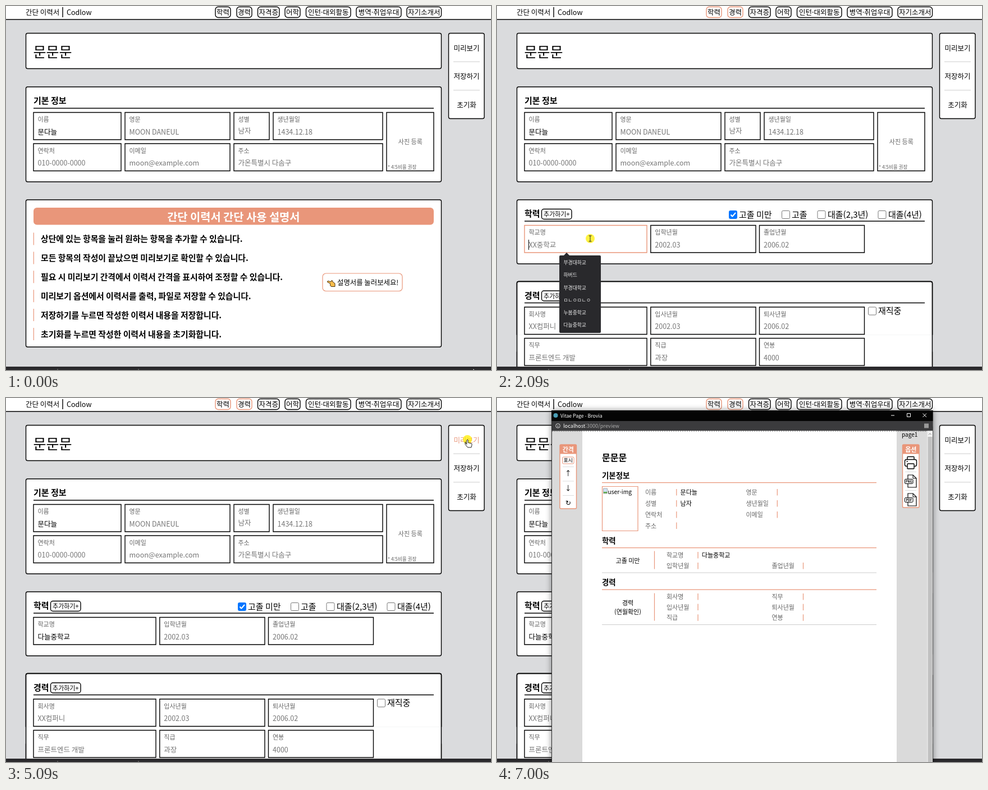
An HTML page with a canvas that plays this animation: 864 by 648 pixels, repeating every 7210 ms.

```html
<!DOCTYPE html>
<html lang="ko">
<head>
<meta charset="utf-8">
<style>
  html, body { margin: 0; width: 100%; height: 100%; overflow: hidden; }
  canvas { display: block; }
</style>
</head>
<body>
<canvas id="stage" width="864" height="648"></canvas>
<script>
const LOOP = 7210;
const FONT = "'Noto Sans CJK KR', 'Noto Sans KR', 'Noto Sans CJK JP', 'Noto Sans', 'DejaVu Sans', sans-serif";
const SALMON = '#e9967a', GRAY = '#666', HINT = '#757575', PAGE = '#dadbdd';
const c = document.getElementById('stage').getContext('2d');

// Pointer path: time, x, y
const PATH = [
  [0, 832, 645], [400, 342, 20], [500, 342, 20], [800, 386, 10], [1100, 388, 10],
  [1200, 399, 13], [1300, 408, 13], [1500, 424, 11], [1700, 424, 11], [2100, 166, 414],
  [2200, 166, 414], [2800, 152, 478], [2900, 152, 478], [3100, 146, 540], [3400, 192, 562],
  [3700, 160, 567], [3800, 160, 567], [4000, 320, 470], [4500, 824, 176], [4600, 824, 176],
  [4800, 822, 126], [5100, 822, 74], [5300, 822, 74], [5500, 737, 116], [5800, 737, 185],
  [6200, 737, 185], [6500, 652, 128], [7000, 852, 652]
];
const CLICKS = [900, 1500, 2100, 3700, 4000, 5100];
const NAV = [['학력', 373, 400], ['경력', 411, 438], ['자격증', 448.5, 487], ['어학', 497, 524],
  ['인턴·대외활동', 534.5, 614], ['병역·취업우대', 624, 704], ['자기소개서', 714, 775.5]];
const SIDE = ['미리보기', '저장하기', '초기화'];
const SCHOOLS = ['부경대하교', '하버드', '부경대학교', 'ㅁㄴㅇㅁㄴㅇ', '누봄중학교', '다늘중학교'];
const GUIDE = ['상단에 있는 항목을 눌러 원하는 항목을 추가할 수 있습니다.',
  '모든 항목의 작성이 끝났으면 미리보기로 확인할 수 있습니다.',
  '필요 시 미리보기 간격에서 이력서 간격을 표시하여 조정할 수 있습니다.',
  '미리보기 옵션에서 이력서를 출력, 파일로 저장할 수 있습니다.',
  '저장하기를 누르면 작성한 이력서 내용을 저장합니다.',
  '초기화를 누르면 작성한 이력서 내용을 초기화합니다.'];

const ARROW = new Path2D('M0 0V13L3 10.2L5 14.8L7 14L5 9.4H9.2Z');
const HAND = new Path2D('M-1.2 1Q0-1 1.2 1V5.5L7 7Q8.5 7.5 8 9.5L6.8 14H0.5L-4 8.5Q-4-0 -2.8 7L-1.2 8.5Z');
const BEAM = new Path2D('M-2.5-5H2.5M0-5V5M-2.5 5H2.5');
const FINGER = new Path2D('M572.5 491.5Q572 489.5 574 489.5L579 491L580 488.5Q582 488 582 491L586 494V499.5H580Q577 499 577.5 494Z');

// Text is placed by its vertical middle
function text(s, x, y, size = 12.5, color = '#000', weight = 400, align = 'left') {
  c.font = `${weight} ${size}px ${FONT}`;
  c.fillStyle = color;
  c.textAlign = align;
  c.fillText(s, x, y + size * 0.37);
}
function rect(x, y, x2, y2, color) {
  c.fillStyle = color;
  c.fillRect(x, y, x2 - x, y2 - y);
}
function box(x, y, x2, y2, stroke = '#000', r = 3, fill = '#fff', width = 1.4) {
  c.beginPath();
  c.roundRect(x, y, x2 - x, y2 - y, r);
  if (fill) { c.fillStyle = fill; c.fill(); }
  if (stroke) { c.strokeStyle = stroke; c.lineWidth = width; c.stroke(); }
}
function line(x, y, x2, y2, color = '#000', width = 1.4) {
  c.beginPath();
  c.moveTo(x, y);
  c.lineTo(x2, y2);
  c.strokeStyle = color;
  c.lineWidth = width;
  c.stroke();
}
function shifted(dy, draw) {
  c.save();
  c.translate(0, dy);
  draw();
  c.restore();
}
function field(label, value, x, y, x2, color = HINT, border = '#000') {
  box(x, y, x2, y + 48.5, border, 0);
  text(label, x + 7.5, y + 12.5, 11, GRAY);
  text(value, x + 7.5, y + 34.5, 12.5, color, color === HINT ? 400 : 500);
}
function checkbox(label, x, y, labelX, checked) {
  box(x, y, x + 14, y + 14, checked ? '#0075ff' : '#767676', 2, checked ? '#0075ff' : '#fff', 1);
  if (checked) {
    line(x + 3, y + 7, x + 6, y + 10.5, '#fff', 2);
    line(x + 5.5, y + 10.5, x + 11.5, y + 3.5, '#fff', 2);
  }
  text(label, labelX, y + 6.5, 15, '#000', 500);
}
function sectionHead(title) {
  box(35.5, 345, 775.5, 459);
  text(title, 49, 369.5, 15, '#000', 700);
  box(79.5, 361.5, 133, 379.5, '#000', 4);
  text('추가하기+', 106.3, 371, 11, '#000', 500, 'center');
  line(49, 383, 762, 383);
}

function pointerAt(t) {
  let i = PATH.findIndex(p => p[0] > t);
  if (i < 0) i = PATH.length - 1;
  const [t0, x0, y0] = PATH[i - 1], [t1, x1, y1] = PATH[i];
  const u = Math.min(1, (t - t0) / (t1 - t0)), e = u * u * (3 - 2 * u);
  return { x: x0 + (x1 - x0) * e, y: y0 + (y1 - y0) * e };
}

function drawHeader(t, hover) {
  rect(0, 0, 864, 24, '#fff');
  line(0, 24, 864, 24, '#000', 1.6);
  text('간단 이력서', 35, 11.5, 12.5, '#000', 500);
  line(101, 2, 101, 20);
  text('Codlow', 108, 11.5, 12.5, '#000', 500);
  NAV.forEach(([name, x, x2], i) => {
    const active = hover.nav === i || (i === 0 && t >= 900) || (i === 1 && t >= 1500);
    box(x, 1.5, x2, 20.5, active ? SALMON : '#000', 5);
    text(name, (x + x2) / 2, 11.5, 12.5, '#000', 500, 'center');
  });
}

function drawSide(hover) {
  box(788.5, 48.5, 852, 200.5);
  SIDE.forEach((name, i) => {
    text(name, 820.5, 75 + i * 50.7, 12.5, hover.side === i ? SALMON : '#000', 500, 'center');
    if (i) line(797, 48.5 + i * 50.7, 844, 48.5 + i * 50.7, '#ccc', 1);
  });
}

function drawBasics() {
  box(35.5, 48.5, 775.5, 111.5);
  text('문문문', 48.5, 82, 25);
  box(35.5, 144, 775.5, 313);
  text('기본 정보', 49, 168.5, 15, '#000', 700);
  line(49, 182, 762, 182);
  field('이름', '문다늘', 49, 189.5, 205, '#000');
  field('영문', 'MOON DANEUL', 212, 189.5, 399);
  field('성별', '', 406, 189.5, 469);
  text('남자', 413.5, 222, 12.5, HINT);
  field('생년월일', '1434.12.18', 476, 189.5, 671);
  field('연락처', '010-0000-0000', 49, 245, 205);
  field('이메일', 'moon@example.com', 212, 245, 399);
  field('주소', '가온특별시 다솜구', 406, 245, 671);
  box(678, 189.5, 762, 293.5, '#000', 0);
  text('사진 등록', 720.3, 242, 11, GRAY, 400, 'center');
  text('* 4:5비율 권장', 680, 287, 8.6, GRAY);
}

function drawEducation(t, hover) {
  const focused = t >= 2100 && t < 4000, picked = t >= 3800;
  const preview = !picked && SCHOOLS[hover.row];
  sectionHead('학력');
  checkbox('고졸 미만', 413.5, 364.5, 431, true);
  checkbox('고졸', 507.5, 364.5, 525);
  checkbox('대졸(2,3년)', 571, 364.5, 589);
  checkbox('대졸(4년)', 679, 364.5, 697);
  const value = picked ? SCHOOLS[5] : preview ? '' : 'XX중학교';
  field('학교명', value, 49, 390.5, 267, picked ? '#000' : HINT, focused ? SALMON : '#000');
  if (preview) text(preview, 56.5, 426, 8.8);
  if (focused) line(56.5, 416, 56.5, 434, '#000', 1);
  field('입학년월', '2002.03', 273.8, 390.5, 461);
  field('졸업년월', '2006.02', 467.5, 390.5, 654.5);
}

function drawCareer() {
  box(35.5, 345, 775.5, 620);
  sectionHead('경력');
  rect(30, 440, 780, 470, PAGE);
  box(35.5, 345, 775.5, 620, '#000', 3, null);
  rect(37, 440, 774, 502, '#fff');
  checkbox('재직중', 661.5, 390.5, 679);
  [['회사명', 'XX컴퍼니', '입사년월', '2002.03', '퇴사년월', '2006.02'],
   ['직무', '프론트엔드 개발', '직급', '과장', '연봉', '4000']].forEach((r, i) => {
    const y = 390.5 + i * 55.5;
    field(r[0], r[1], 49, y, 267);
    field(r[2], r[3], 273.8, y, 461);
    field(r[4], r[5], 467.5, y, 654.5);
  });
}

function drawGuide() {
  box(35.5, 345, 775.5, 607);
  box(49, 359, 762, 389.5, null, 6, SALMON);
  text('간단 이력서 간단 사용 설명서', 405.3, 375.5, 19.8, '#fff', 700, 'center');
  GUIDE.forEach((s, i) => {
    const y = 415 + i * 33.9;
    line(49.3, y - 11.5, 49.3, y + 10.5, SALMON, 1.2);
    text(s, 62, y, 14.85, '#000', 700);
  });
  box(564, 476, 706, 507.5, SALMON, 6, '#fff', 1.2);
  c.fillStyle = '#f9bd4b';
  c.fill(FINGER);
  c.strokeStyle = '#4a3418';
  c.lineWidth = 1;
  c.stroke(FINGER);
  text('설명서를 눌러보세요!', 590, 492, 12.4, '#000', 500);
}

function drawDropdown(hover) {
  c.fillStyle = '#29292c';
  c.beginPath();
  c.moveTo(118, 445);
  c.lineTo(124, 439);
  c.lineTo(130, 445);
  c.fill();
  box(111, 444, 185, 582, null, 2, '#29292c');
  SCHOOLS.forEach((name, i) => {
    const y = 457 + i * 22.2;
    if (hover.row === i) rect(111, y - 11, 185, y + 11, '#3f3f43');
    text(name, 118.5, y, 8.8, '#eee');
  });
}

function printerIcon(color) {
  box(731, 104.5, 743, 110, color, 1);
  box(726.5, 109.5, 747.5, 121.5, color, 3);
  box(731, 117, 743, 126, color, 1);
  line(729.5, 113, 732, 113, color);
}
function fileIcon(label, y, color) {
  c.beginPath();
  for (const [x, dy] of [[732, -11], [741, -11], [747, -5], [747, 11], [732, 11]]) c.lineTo(x, y + dy);
  c.closePath();
  c.strokeStyle = color;
  c.lineWidth = 1.2;
  c.stroke();
  line(741, y - 11, 741, y - 5, color, 1);
  line(741, y - 5, 747, y - 5, color, 1);
  box(726.5, y - 3.5, 741, y + 4.5, color, 1.5, '#fff', 1);
  text(label, 733.8, y + 0.5, 5.5, color, 700, 'center');
}
function panel(title, x, x2, bottom) {
  box(x, 83, x2, bottom, SALMON, 2);
  rect(x, 83, x2, 99.5, SALMON);
  text(title, (x + x2) / 2, 91.5, 11, '#fff', 700, 'center');
}
// Label, bar and value in the printed sheet
function entry(label, x, barX, y, value = '') {
  text(label, x, y, 11, GRAY);
  line(barX, y - 6, barX, y + 5.5, SALMON, 1.2);
  text(value, barX + 6.8, y, 11, '#000', 500);
}
function sheetHead(title, y) {
  text(title, 187, y, 13.4, '#000', 700);
  line(187, y + 12.7, 676, y + 12.7, SALMON, 1.2);
}

function drawSheet(hover) {
  rect(98, 58.5, 776, 648, '#dadada');
  rect(152, 58.5, 712, 648, '#fff');
  c.setLineDash([2, 2]);
  line(98, 59, 766, 59, '#777', 1);
  c.setLineDash([]);
  rect(766.5, 58.5, 776, 648, '#f1f1f1');
  rect(767.5, 69, 775.5, 648, '#c1c1c1');
  line(769, 65.5, 771.3, 63, '#888', 1);
  line(771.3, 63, 773.5, 65.5, '#888', 1);
  text('page1', 721, 65, 10);

  panel('간격', 112, 141.5, 197);
  box(116.5, 105, 137, 117, SALMON, 2, '#fff', 1);
  text('표시', 126.8, 111, 9, '#000', 500, 'center');
  ['↑', '↓', '↻'].forEach((s, i) => {
    line(117, 122.5 + i * 25.5, 137, 122.5 + i * 25.5, '#ddd', 1);
    text(s, 126.8, 135 + i * 26, 12, '#000', 400, 'center');
  });

  panel('옵션', 722.5, 752, 195);
  const tint = i => hover.option === i ? '#eeb29e' : '#000';
  printerIcon(tint(0));
  fileIcon('PNG', 148, tint(1));
  fileIcon('PDF', 181, tint(2));
  line(727, 131.5, 747, 131.5, '#ddd', 1);
  line(727, 164.5, 747, 164.5, '#ddd', 1);
  if (hover.option >= 0) {
    box(722.5, 197, 752, 226.5, null, 3, '#6f6f6f');
    text(['', 'PNG', 'PDF'][hover.option], 737.3, 205, 10, '#fff', 700, 'center');
    text(hover.option ? '저장' : '출력', 737.3, 219, 10, '#fff', 700, 'center');
  }

  text('문문문', 187, 106, 16, '#000', 700);
  sheetHead('기본정보', 138);
  box(187.5, 157.5, 251, 236.5, SALMON, 0, '#fff', 1.2);
  box(189.5, 161, 196.5, 170, '#aaa', 0, '#cfe3f7', 1);
  rect(190, 167, 196, 169.5, '#5fa84a');
  text('user-img', 197.5, 167, 10.3);
  entry('이름', 264, 319.8, 168, '문다늘');
  entry('성별', 264, 319.8, 188, '남자');
  entry('연락처', 264, 319.8, 208);
  entry('주소', 264, 319.8, 227.5);
  ['영문', '생년월일', '이메일'].forEach((s, i) => entry(s, 443.5, 499.3, 168 + i * 20));

  sheetHead('학력', 254);
  text('고졸 미만', 233, 289.5, 11, '#000', 500, 'center');
  line(280.5, 272.5, 280.5, 304.5, SALMON, 1.2);
  entry('학교명', 302, 358, 280, SCHOOLS[5]);
  entry('입학년월', 302, 358, 299);
  entry('졸업년월', 489.5, 545.5, 299);
  line(187, 311, 676, 311, '#ccc', 1);

  sheetHead('경력', 328.5);
  text('경력', 233, 365, 11, '#000', 500, 'center');
  text('(연월확인)', 233, 381, 11, '#000', 500, 'center');
  line(280.5, 347.5, 280.5, 396.5, SALMON, 1.2);
  [['회사명', '직무'], ['입사년월', '퇴사년월'], ['직급', '연봉']].forEach(([a, b], i) => {
    entry(a, 302, 358, 354 + i * 18.6);
    entry(b, 489.5, 545.5, 354 + i * 18.6);
  });
  line(187, 403.5, 676, 403.5, '#ccc', 1);
}

function drawWindow(t, hover) {
  c.save();
  c.shadowColor = 'rgba(0,0,0,.45)';
  c.shadowBlur = 10;
  rect(97, 22, 776.5, 660, '#2b2b2b');
  c.restore();
  rect(97, 22, 776.5, 41, '#050505');
  rect(98, 41, 776, 58.5, '#3b3b3d');
  line(702, 31, 708, 31, '#fff', 1);
  box(730.5, 27.5, 736.5, 33.5, '#fff', 0, null, 1);
  line(758.5, 27.5, 765, 34, '#fff', 1);
  line(765, 27.5, 758.5, 34, '#fff', 1);
  box(104.7, 45.7, 112.3, 53.3, '#ddd', 4, null, 1);
  line(108.5, 48.7, 108.5, 51.8, '#ddd', 1);
  text('localhost', 118, 49.5, 9.2, '#fff');
  const hostWidth = c.measureText('localhost').width;
  text(':3000/preview', 118 + hostWidth, 49.5, 9.2, '#aaa');
  if (t < 5400) return rect(98, 58.5, 776, 648, '#fff');
  box(100.5, 27, 108.5, 35, null, 4, '#4a9db5');
  text('Vitae Page - Brovia', 113, 31.5, 8.7, '#fff');
  box(761, 45.5, 769, 53.5, null, 0, '#999');
  drawSheet(hover);
}

function drawPointer(t, p, hover) {
  if (CLICKS.includes(t)) {
    c.fillStyle = 'rgba(255,238,0,.75)';
    c.beginPath();
    c.arc(p.x, p.y, 8, 0, 7);
    c.fill();
  }
  const overField = t >= 1700 && t < 2500 && p.x > 49 && p.x < 267 && p.y > 390 && p.y < 439;
  const overLink = hover.nav >= 0 || hover.side >= 0 || hover.option >= 0;
  const shape = overField ? BEAM : overLink ? HAND : ARROW;
  c.save();
  c.translate(p.x, p.y);
  c.fillStyle = '#fff';
  c.strokeStyle = '#222';
  c.lineWidth = 1;
  if (shape !== BEAM) c.fill(shape);
  c.stroke(shape);
  c.restore();
}

function frame(now) {
  const t = Math.floor((now % LOOP + 10) / 100) * 100;
  const p = pointerAt(t);
  const opened = t >= 2100 && t < 3800, preview = t >= 5200;
  const within = (x, x2, y, y2) => p.x > x && p.x < x2 && p.y > y && p.y < y2;
  const hover = {
    nav: p.y < 21 ? NAV.findIndex(n => p.x >= n[1] && p.x <= n[2]) : -1,
    side: within(789, 852, 49, 200) ? Math.floor((p.y - 48.5) / 50.7) : -1,
    row: opened && within(111, 185, 446, 580) ? Math.floor((p.y - 446) / 22.2) : -1,
    option: t >= 5400 && within(722, 752, 100, 195) ? Math.min(2, Math.floor((p.y - 99) / 32.7)) : -1
  };
  rect(0, 0, 864, 648, PAGE);
  drawHeader(t, hover);
  drawSide(hover);
  drawBasics();
  if (t >= 1000) drawEducation(t, hover);
  if (t >= 1600) shifted(145.5, drawCareer);
  else shifted(t >= 1000 ? 145.5 : 0, drawGuide);
  rect(0, 642, 864, 648, '#2a292c');
  rect(91, 646, 93, 648, '#555');
  rect(235, 646, 237, 648, '#555');
  if (opened) drawDropdown(hover);
  if (preview) drawWindow(t, hover);
  drawPointer(t, p, hover);
  requestAnimationFrame(frame);
}
requestAnimationFrame(frame);
</script>
</body>
</html>
```
